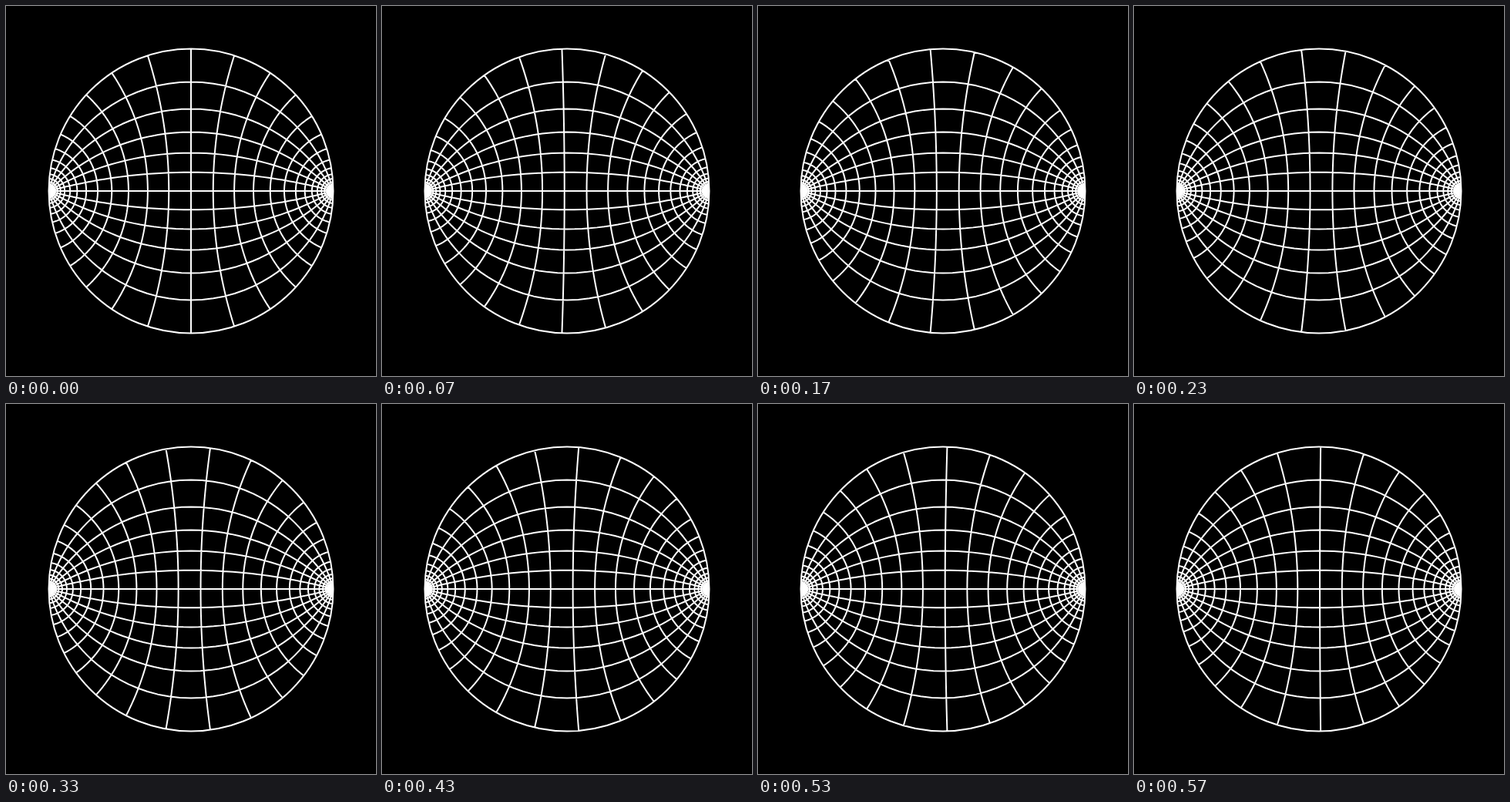
Recreate the animation shown at these times as an HTML page with a canvas. Size 480 by 480 pixels, loop 610 ms.

```html
<!DOCTYPE html>
<html>
<head>
<meta charset="utf-8">
<title>Bipolar grid</title>
<style>
  html, body { margin: 0; background: #000; overflow: hidden; }
  canvas { display: block; }
</style>
</head>
<body>
<canvas width="480" height="480"></canvas>
<script>
const ctx = document.querySelector('canvas').getContext('2d');
const R = 184.5;             // half the distance between the foci
const SPACING = Math.PI / 10;
const DRIFT = 0.0178;        // shift of the cross lines per step
const LOOP = 610;
const start = performance.now();

// Bipolar coordinates (tau, sigma) to the plane
function point(tau, sigma) {
  const d = Math.cosh(tau) + Math.cos(sigma);
  return [R * Math.sinh(tau) / d, R * Math.sin(sigma) / d];
}

function curve(from, to, segments, toPoint) {
  for (let i = 0; i <= segments; i++) {
    const [x, y] = toPoint(from + (to - from) * i / segments);
    if (i) ctx.lineTo(x, y);
    else ctx.moveTo(x, y);
  }
}

function draw(step) {
  ctx.setTransform(1, 0, 0, 1, 0, 0);
  ctx.fillStyle = '#000';
  ctx.fillRect(0, 0, 480, 480);
  ctx.translate(240, 240);
  ctx.strokeStyle = '#fff';
  ctx.lineWidth = 2;
  ctx.lineJoin = 'round';
  ctx.beginPath();
  ctx.arc(0, 0, R, 0, 2 * Math.PI);
  for (let i = -5; i <= 5; i++) {
    curve(-7, 7, 140, tau => point(tau, i * Math.PI / 12));
  }
  for (let i = -16; i <= 17; i++) {
    const tau = i * SPACING - step * DRIFT;
    curve(-Math.PI / 2, Math.PI / 2, 60, sigma => point(tau, sigma));
  }
  ctx.stroke();
}

// Thirty steps a second, on a clock of 10 ms ticks
function frame() {
  const tick = Math.floor((performance.now() - start) % LOOP / 10);
  draw(Math.min(17, Math.floor((3 * tick + 1) / 10)));
  requestAnimationFrame(frame);
}
frame();
</script>
</body>
</html>
```
